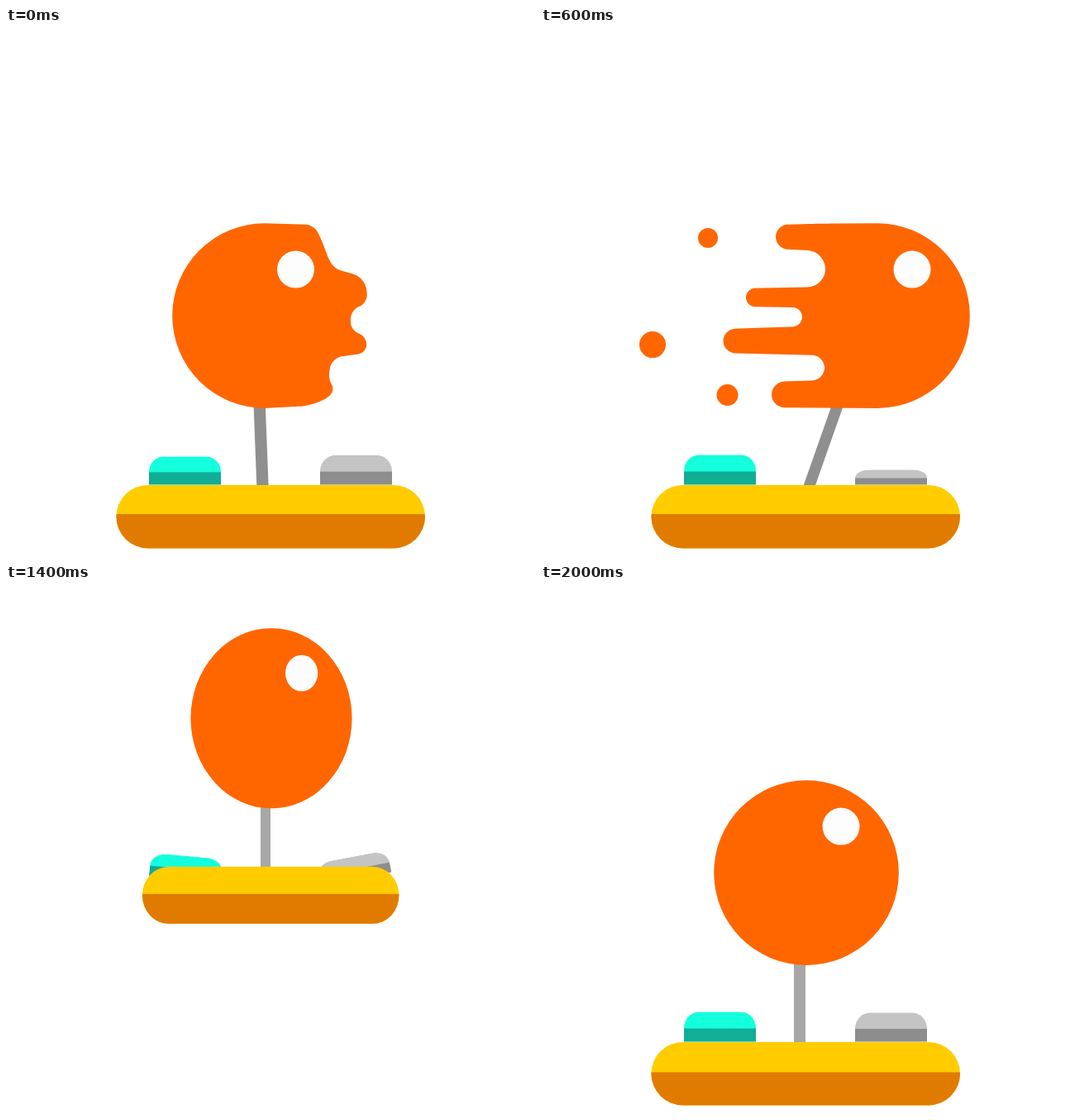
These frames come from a looping animation (640 by 640 pixels, 2400 ms). An HTML page:

```html
<!DOCTYPE html>
<html lang="en">
<head>
<meta charset="utf-8">
<title>Joystick</title>
<style>
  html, body { margin: 0; width: 100%; height: 100%; overflow: hidden; background: #fff; }
  svg { display: block; width: 100vw; height: 100vh; }
</style>
</head>
<body>
<svg viewBox="0 0 640 640">
  <defs>
    <clipPath id="baseShape"><rect x="-186.8" y="0" width="373.6" height="76.6" rx="38.3"/></clipPath>
    <clipPath id="capShape"><path d="M-43.5 0V-16C-43.5 -28 -35 -36 -23.5 -36H23.5C35 -36 43.5 -28 43.5 -16V0Z"/></clipPath>
  </defs>
  <path id="stick"/>
  <g id="teal"><g clip-path="url(#capShape)">
    <rect x="-44" y="-36" width="88" height="36" fill="#14ffdc"/>
    <rect x="-44" y="-16" width="88" height="16" fill="#10ae94"/>
  </g></g>
  <g id="grey"><g clip-path="url(#capShape)">
    <rect x="-44" y="-36" width="88" height="36" fill="#c4c4c4"/>
    <rect x="-44" y="-16" width="88" height="16" fill="#8d8d8d"/>
  </g></g>
  <g id="base"><g clip-path="url(#baseShape)">
    <rect x="-188" y="-1" width="376" height="79" fill="#fc0"/>
    <rect id="shade" x="-188" width="376" height="79" fill="#e17b00"/>
  </g></g>
  <g id="ball">
    <path id="body" fill="#f60"/>
    <g id="drops" fill="#f60">
      <circle cx="-205" cy="-94" r="12"/>
      <circle cx="-272" cy="35" r="16"/>
      <circle cx="-181.5" cy="96" r="13"/>
    </g>
    <circle id="shine" cy="-56" r="22.5" fill="#fdfdfd"/>
  </g>
</svg>
<script>
// Time runs in steps of 100 ms: the stick swings, then the whole thing jumps.
const STEP = 100, LOOP = 2400, LAST = 20, JUMP = 10;
const CENTRE = 321, FLOOR = 629.5, R = 111.8, BASE = 76.6, SHAFT = 93;
const PEAK = 15.4, HALF_FLIGHT = 2.6, HEIGHT = 279;

const strokes = [
  { begin: -.45, end: 2, travel: -90 },
  { begin: 3.27, end: 6, travel: 176 },
  { begin: 6.9, end: 9.9, travel: -86 }
];

// Corners of the trailing edge, relative to the ball centre, from bottom to top.
const blob = [[-59, 110], [-68, 93], [-78, 67], [-85, 57], [-122, 46], [-124, 15], [-104, 7],
  [-104, -18], [-123, -25], [-123, -45], [-81, -51], [-77, -76], [-84, -89], [-77, -99], [-54, -109]];
// Each turn of the long streak: x, lower y, upper y.
const streak = [[-128, 111, 80], [-64, 78, 48], [-186.5, 45, 16], [-91, 13, -10],
  [-159, -11, -33], [-63, -35, -78], [-123, -81, -110]]
  .flatMap(([x, low, high]) => [[x, low], [x, high]]).concat([[-67, -111.4]]);

const el = id => document.getElementById(id);
const set = (id, attrs) => { for (const k in attrs) el(id).setAttribute(k, attrs[k]); };
const mix = (a, b, k) => a + (b - a) * k;
const clamp = k => Math.max(0, Math.min(1, k));
const ease = k => k * k * (3 - 2 * k);
const between = (p, q, k) => [mix(p[0], q[0], k), mix(p[1], q[1], k)];
const distance = (p, q) => Math.hypot(q[0] - p[0], q[1] - p[1]);
const toward = (p, q, length) => between(p, q, length / distance(p, q));

function outline(stretch) {
  const front = `M0 ${-R}A${R} ${R} 0 0 1 0 ${R}`;
  if (stretch === null) return front + `A${R} ${R} 0 0 1 0 ${-R}Z`;
  const points = [[0, R], ...blob.map((p, i) => between(p, streak[i], stretch)), [0, -R]];
  let d = front;
  for (let i = 1; i < points.length - 1; i++) {
    const [p, c, n] = points.slice(i - 1, i + 2);
    const cut = Math.min(22, distance(c, p) / 2, distance(c, n) / 2);
    d += `L${toward(c, p, cut)}C${toward(c, p, cut * .45)} ${toward(c, n, cut * .45)} ${toward(c, n, cut)}`;
  }
  return d + 'Z';
}

function swing(step) {
  let lean = 0, side = 0, stretch = null;
  for (const { begin, end, travel } of strokes) {
    const k = clamp((step - begin) / (end - begin));
    lean += travel * ease(k);
    if (step > begin && step <= end) {
      side = -Math.sign(travel);
      stretch = k ** 3;
    }
  }
  return { lean, side, stretch };
}

function drawBall(x, y, wide, tall, { side, stretch }) {
  const transform = side > 0 ? 'rotate(180)' : '';
  set('ball', { transform: `translate(${x} ${y}) scale(${wide} ${tall})` });
  set('body', { d: outline(stretch), transform });
  set('drops', { transform, visibility: stretch === 1 ? 'visible' : 'hidden' });
  set('shine', { cx: side > 0 ? 37.5 : 42 });
}

function drawStick(upper, lower, width, top, bottom, fill) {
  // The shaft runs on a little way behind the ball.
  const hidden = 25, end = upper + (upper - lower) / (bottom - top) * hidden;
  set('stick', { fill, d: `M${lower} ${bottom + 1}L${end} ${top - hidden}h${width}L${lower + width} ${bottom + 1}Z` });
}

function drawCap(id, x, y, tilt, tall) {
  set(id, { transform: `translate(${x} ${y}) rotate(${tilt}) scale(1 ${tall})` });
}

function draw(step) {
  const motion = swing(step), { lean } = motion, jumping = step >= JUMP;

  // u goes from -1 at take-off to 1 at landing.
  const u = (step - PEAK) / HALF_FLIGHT;
  const flight = clamp(1 - Math.abs(u) ** 2.5);
  const air = clamp(flight * 4);
  const hump = middle => clamp(1 - Math.abs(step - middle) / 2);
  const crouch = hump(12) + hump(18);
  const pose = (squash, mid, slope) => mix(1 + squash * crouch, mid + slope * u, air);

  const ballTall = pose(-.14, .875, -.186);
  const baseTall = pose(-.18, .96, .11);
  const baseTop = FLOOR - HEIGHT * flight - BASE * baseTall;
  const ballBottom = baseTop - SHAFT * pose(-.1, .675, -.156);

  drawBall(CENTRE + lean, ballBottom - R * ballTall, pose(.13, .93, .107), ballTall, motion);

  if (jumping) {
    const width = (u < 1 ? 18 : 14) * pose(.1, .885, .4);
    drawStick(320 - width, 320 - width, width, ballBottom, baseTop, '#a7a7a7');
  } else {
    drawStick(304 + lean * .54, 304.5 + lean * .15, 14.3, ballBottom, baseTop, '#8f8f8f');
  }

  set('base', { transform: `translate(320.2 ${baseTop}) scale(${pose(.183, .82, -.021)} ${baseTall})` });
  set('shade', { y: jumping ? 36.6 : 35.2 });

  // Leaning presses the cap on that side; in the air both lag behind the base.
  const left = clamp(-lean / 90), right = clamp(lean / 86);
  const capY = baseTop - .2 - (4.6 + 36.5 * u) * air;
  const capTall = pose(-.2, .77, 0);
  drawCap('teal', 216.5, capY, (-2.1 - 13.3 * u) * air, capTall * 1.01 - .62 * left);
  drawCap('grey', 423.5, capY, 20 * u * air, capTall * .985 + .17 * left - .475 * right);
}

const start = performance.now();
function frame() {
  const time = (performance.now() - start) % LOOP;
  draw(Math.min(LAST, Math.floor(time / STEP)));
  requestAnimationFrame(frame);
}
frame();
</script>
</body>
</html>
```
